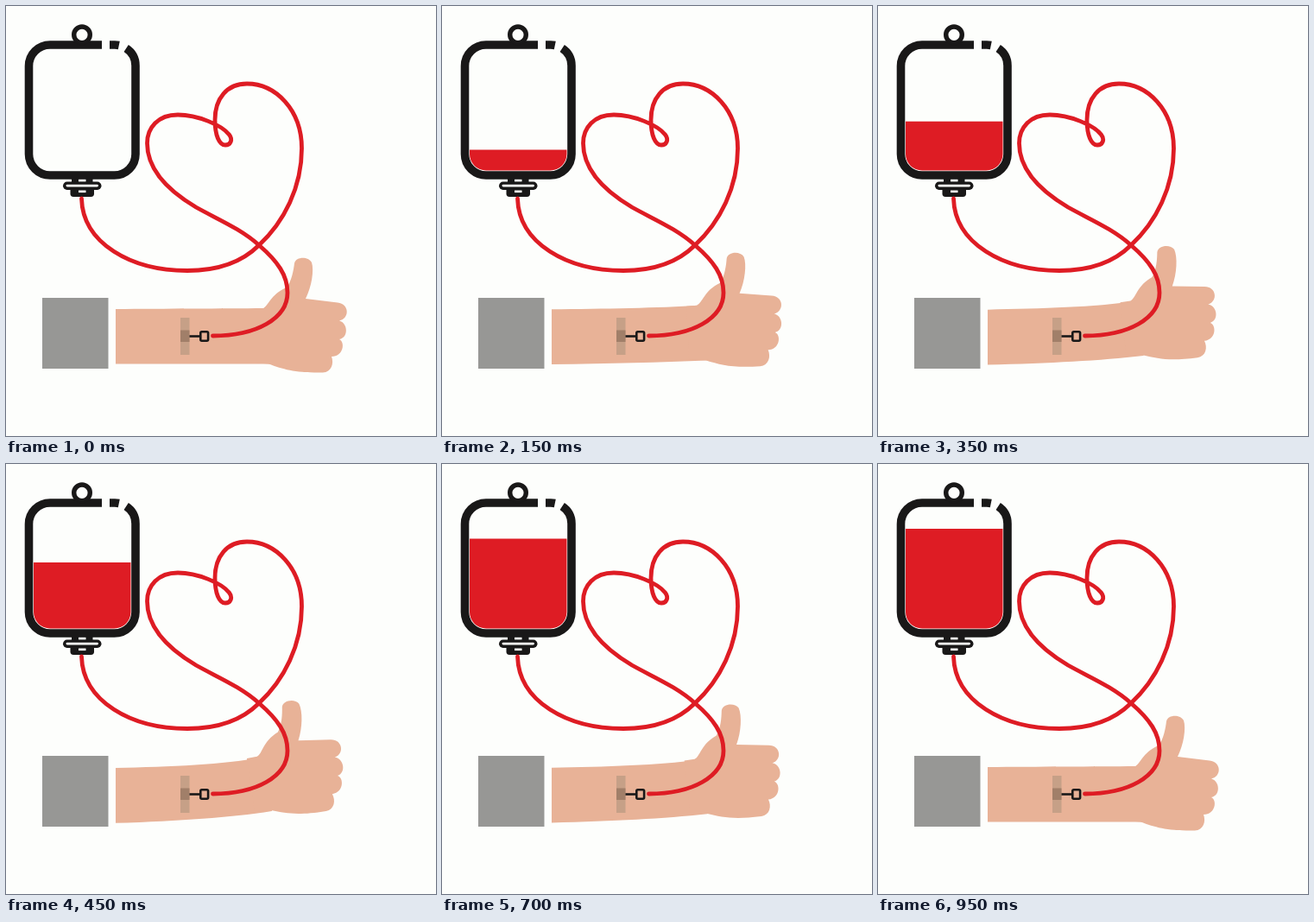
These frames come from a looping animation (498 by 498 pixels, 1000 ms). An HTML page:

```html
<!DOCTYPE html>
<html lang="en">
<head>
<meta charset="utf-8">
<title>Blood donation</title>
<style>
  html, body { margin: 0; width: 100%; height: 100%; overflow: hidden; background: #fdfefc; }
  svg { display: block; width: 100%; height: 100%; }
  .ink { fill: none; stroke: #191818; }
  .skin { fill: #e8b297; }
  .red { fill: #de1c24; }
  .tube { fill: none; stroke: #de1c24; stroke-width: 4.8; stroke-linecap: round; stroke-linejoin: round; }
</style>
</head>
<body>
<svg viewBox="0 0 498 498">
  <defs>
    <clipPath id="inside"><rect x="32" y="51" width="112.5" height="139.5" rx="19"/></clipPath>
  </defs>

  <!-- bag -->
  <g clip-path="url(#inside)"><rect id="blood" class="red" x="32" y="191" width="113" height="140"/></g>
  <g class="ink" stroke-width="9.6">
    <path d="M111 45H51A24.5 24.5 0 0 0 26.5 69.500V171.500A24.500 24.500 0 0 0 51 196H125.500A24.500 24.500 0 0 0 150 171.500V69A24 24 0 0 0 139.200 49"/>
    <path d="M120 45H126A24 24 0 0 1 130.800 45.500"/>
    <circle cx="88" cy="33.300" r="9.300" stroke-width="5.400"/>
  </g>

  <!-- outlet -->
  <g fill="#191818">
    <rect x="76" y="198" width="24.500" height="8"/>
    <path d="M74.500 211H102V218Q101.500 221 98.500 221H78Q75 221 74.500 218Z"/>
    <rect x="66" y="203.500" width="44.500" height="9.500" rx="4.700"/>
  </g>
  <g fill="#fdfefc">
    <rect x="84" y="200.800" width="8.500" height="2.600"/>
    <rect x="69.500" y="206.700" width="37.500" height="2.800" rx="1.400"/>
    <rect x="84" y="213.500" width="8.500" height="2.600"/>
  </g>

  <!-- arm -->
  <rect x="42" y="338" width="76.500" height="82" fill="#979795"/>
  <path id="forearm" class="skin"/>
  <path id="hand" class="skin" d="M285 351L297 350.500C304 348 306 334 325 326C331 318 333 306 334 298C336 290 350 290 354 297C357 306 354 325 347 339L384 343.500C398 345 398 362 386 364.500C396 367 397 384 386 386C393 389 391 406 377 406C380 414 377 424 367 424.500C335 425 322 421 304 414.500L285 413Z"/>

  <!-- tape and needle -->
  <rect x="202" y="361" width="10.500" height="43" fill="#c6a087"/>
  <rect x="202" y="375.500" width="10.500" height="13.500" fill="#a17f69"/>
  <g class="ink" stroke-width="2.600">
    <path d="M212.500 382.500H225"/>
    <rect x="225.300" y="377.300" width="8.800" height="10.400" rx="1.500"/>
  </g>

  <path class="tube" stroke-linecap="butt" d="M87.500 223C89 275 145 306.500 210 306.500C245 306.500 273 297 293 277C322 250 342.500 210 342.500 165C342.500 120 312 90 279 90C256 90 242 107 242 132C242 150 247 161 254 161C260 161 263 155 258.500 149C250 138 222 126 199 126C176 126 163.500 141 163.500 159C163.500 190 188 214 220 233C245 247 272 258 293 277C315 296 326 312 326 332C326 362 290 382 239.500 382"/>
</svg>
<script>
  const LOOP = 1000, STEP = 50, TILT = 9.2;
  // [step, value] keys
  const LEVEL = [[0, 191], [3, 166.5], [6, 143.5], [9, 114], [11, 102], [14, 86.5], [19, 75]];
  const BEND = [[0, 0], [3, .29], [6, .58], [9, .9], [11, 1], [14, .66], [19, 0]];

  const blood = document.getElementById('blood');
  const hand = document.getElementById('hand');
  const forearm = document.getElementById('forearm');
  const start = performance.now();

  const mix = (a, b, k) => a + (b - a) * k;

  function sample(keys, n) {
    const i = Math.max(1, keys.findIndex(key => key[0] >= n));
    const [a, va] = keys[i - 1], [b, vb] = keys[i];
    return mix(va, vb, (n - a) / (b - a));
  }

  function forearmPath(k) {
    const p = (x0, y0, x1, y1) => `${mix(x0, x1, k)} ${mix(y0, y1, k)} `;
    return 'M' + p(127, 351, 127, 352) +
      'C' + p(185, 350.5, 190, 350.5) + p(250, 350.5, 255, 348) + p(299, 350, 293, 338.5) +
      'L' + p(325, 380, 321, 368) + 'L' + p(306, 414.5, 308, 400.5) +
      'C' + p(250, 414.5, 260, 409) + p(190, 414.5, 205, 413) + p(127, 414.5, 127, 416) + 'Z';
  }

  function draw() {
    const t = Math.max(0, performance.now() - start + 1) % LOOP;
    const n = Math.floor(t / STEP);
    const k = sample(BEND, n);
    blood.setAttribute('y', sample(LEVEL, n));
    hand.setAttribute('transform', `rotate(${-TILT * k} 213 388)`);
    forearm.setAttribute('d', forearmPath(k));
    requestAnimationFrame(draw);
  }
  draw();
</script>
</body>
</html>
```
